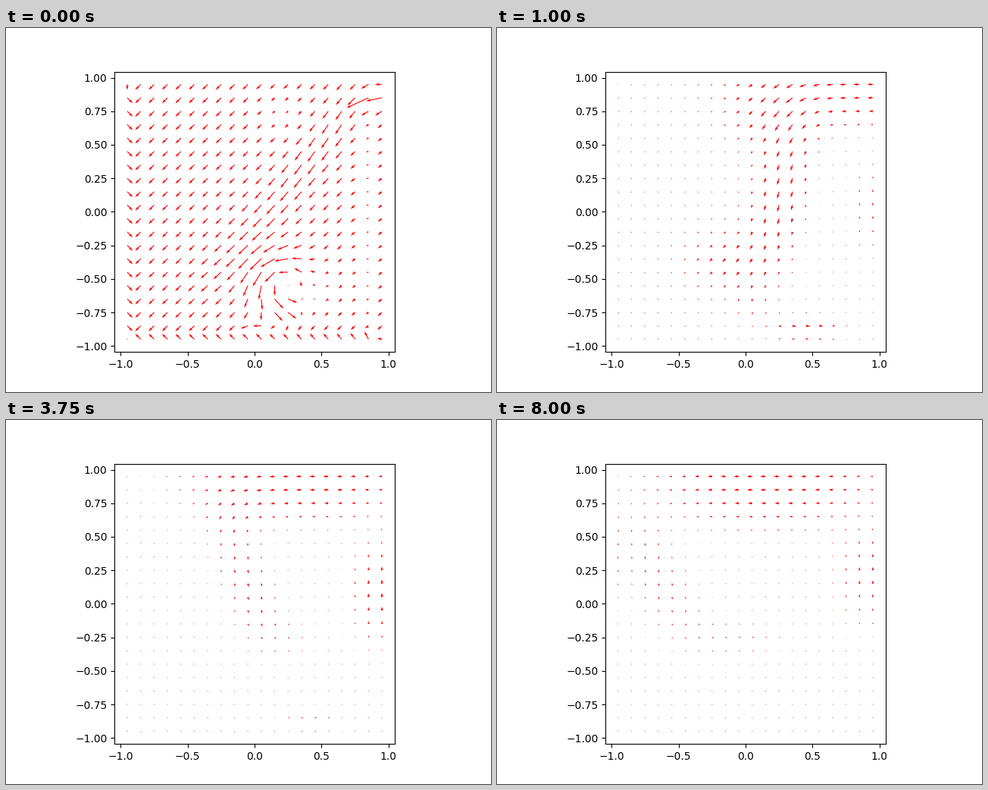
A matplotlib script for the animation above (8.05 s loop, 640 by 480 pixels).

```python
import numpy as np
import matplotlib.pyplot as plt
from matplotlib.animation import FuncAnimation

STEP = 50
FRAMES = 161

axis = np.linspace(-0.95, 0.95, 20)
X, Y = np.meshgrid(axis, axis)


# Velocities are complex numbers (u + iv) in pixels.
def bell(d, width):
    return np.exp(-(d / width) ** 2)


def patch(x, y, w, h, vel):
    return vel * bell(X - x, w) * bell(Y - y, h)


def swirl(x, y, r, spin):
    d = X - x + 1j * (Y - y)
    return 1j * spin * d * bell(abs(d), r)


def fade(t, tau):
    return np.exp(-t / tau)


def opening():
    """Diagonal jet that enters top right and curls up near the bottom."""
    line = 0.12 + 0.75 * Y
    jet = (-4 + 3 * Y - 1j * (5 + 4 * Y)) * bell(X - line, 0.2)
    jet *= np.exp(-((Y - 0.15) / 0.7) ** 4)
    inlet = patch(.88, .85, .09, .08, -27 - 10j) + patch(1, .9, .08, .1, 14j)
    curl = swirl(.2, -.5, .2, 140) + patch(.2, -.72, .12, .1, 14 - 4j)
    backwash = patch(.05, -.86, .12, .05, -6 + 8j)
    calm = (patch(.86, .2, .1, 1.2, 4 + 7j)
            + patch(.22, .75, .18, .17, 4 + 4.5j)
            + patch(.6, -.55, .3, .3, 3 + 3j))
    return jet + inlet + curl + backwash + calm


def vortex(t):
    """Large counter-clockwise cell whose falling side drifts left."""
    col = 0.43 - 0.14 * t
    lean = 1.1 * fade(t, 1.5) - 0.4

    top = patch(.12 + .9 * fade(t, 2.8), .92, .9 - .7 * fade(t, 1),
                .28 + .012 * t, -7.3 - 3 * fade(t, 1))
    bend = patch(col - .05, .8 - .025 * t, .28, .27,
                 -4.5 * fade(t, 2.5) - 1j * (1.3 + 8 * fade(t, 2)))
    fall = (-(lean + 1j) * (3.2 + 8 * fade(t, 2)) * bell(Y - .15, .5)
            * bell(X - col - lean * (Y - .3), .17 + .02 * t))
    spread = patch(-.1, -.35, .3, .22, (-6 - 6j) * fade(t, 1.5))
    knee = patch(.05, -.68, .16, .15, (3.5 - 6j) * fade(t, .9))
    floor = patch(.42, -.87, .32, .13, 9.5 * fade(t, 3.2))
    sweep = patch((col + .6) / 2, -.25, .5, .2, 2.8 * (1 - fade(t, 3)))
    rise = patch(.92, .025 * t, .17 + .015 * t, .43,
                 7j * (1 - fade(t * t, 1.2)) * fade(t, 20))
    return top + bend + fall + spread + knee + floor + sweep + rise


START = opening()


def flow(t):
    early = fade(t, .2)
    left = 1 / (1 + np.exp((X - .5) / .1))
    drift = -7.2 * (1 + 1j) * fade(t, .6) * (early + (1 - early) * left)
    f = drift + (1 - early) * vortex(t)
    # Left and bottom walls mirror the flow next to them.
    f[:, 0] = -f[:, 1].conj()
    f[0] = f[0].real - 1j * f[1].imag
    f[0, 0] = 0
    f[-1, 0] = 1j * f[-1, 0].imag
    f[0, -1] = f[0, -1].real
    f += early * START
    return f.real, f.imag


fig, ax = plt.subplots(figsize=(6.4, 4.8), dpi=100)
ax.set_aspect("equal")
arrows = ax.quiver(X, Y, *flow(0), color="red", scale=1, scale_units="dots")


def update(i):
    arrows.set_UVC(*flow(i * STEP / 1000))
    return arrows,


anim = FuncAnimation(fig, update, frames=FRAMES, interval=STEP,
                     repeat=True, repeat_delay=0)
plt.show()
```
